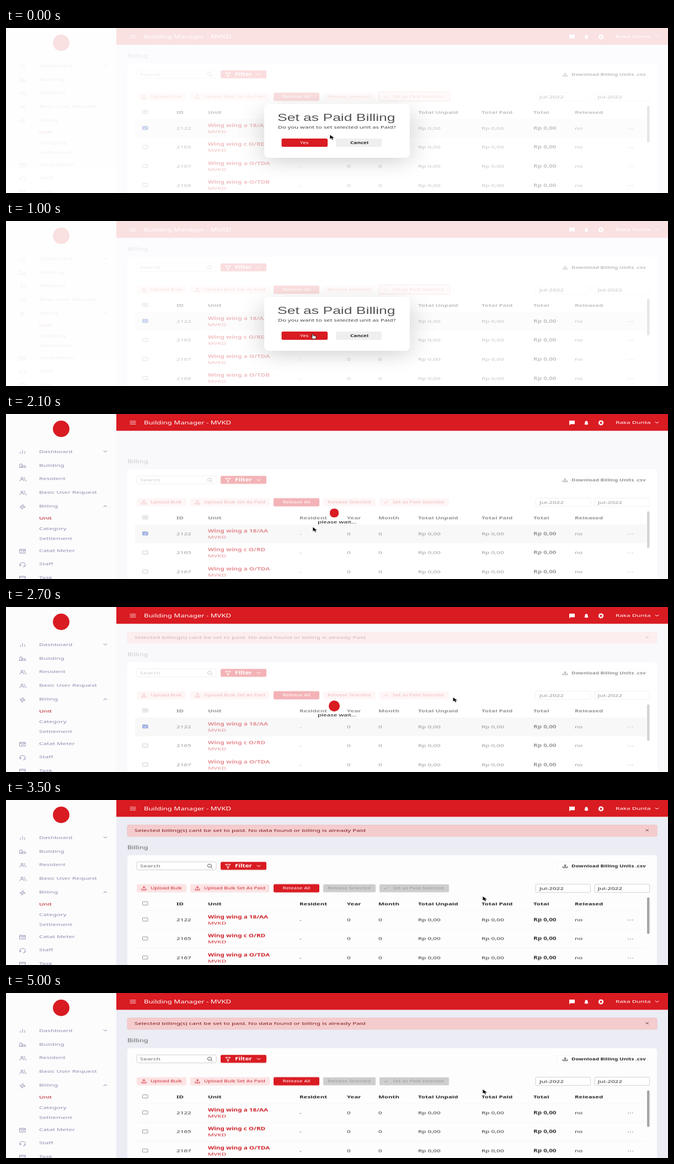
Animation, 1200 px wide and 300 px high, one loop 5100 ms. Source, as an HTML page:

```html
<!DOCTYPE html>
<html lang="en">
<head>
<meta charset="utf-8">
<title>Set as Paid Billing</title>
<style>
  html, body { margin: 0; width: 100%; height: 100%; overflow: hidden; background: #fff; }
  svg { display: block; width: 1200px; height: 300px; font-family: "Noto Sans", "Open Sans", sans-serif; }
  svg * { animation-duration: 5.1s; animation-iteration-count: infinite; animation-timing-function: step-end; }

  .base { animation-name: base; }
  .cells { animation-name: cells; }
  .nav { animation-name: nav; }
  .shift { animation-name: shift; }
  .alert { animation-name: alert; }
  .picked { animation-name: picked; }
  .idle { animation-name: idle; }
  .focus { animation-name: focus; }
  .dialog { animation-name: dialog; }
  .ring { animation-name: ring; }
  .loader { animation-name: loader; }
  .pulse { transform-origin: 595px 180px; animation: pulse 1.2s -.9s ease-in-out infinite; }
  .cursor { animation-name: move; animation-timing-function: linear; }
  .arrow { animation-name: arrow; }
  .hand { animation-name: hand; }

  @keyframes base { 0% { opacity: .15 } 41.176% { opacity: .33 } 56.863%, 100% { opacity: 1 } }
  @keyframes cells { 0% { opacity: .28 } 41.176% { opacity: .5 } 56.863%, 100% { opacity: 1 } }
  @keyframes nav { 0% { opacity: .13 } 41.176%, 100% { opacity: 1 } }
  @keyframes shift { 0% { transform: translateY(-35.5px) } 41.176%, 100% { transform: none } }
  @keyframes alert { 0% { opacity: 0 } 43.137%, 100% { opacity: 1 } }
  @keyframes picked { 0% { opacity: 1 } 56.863%, 100% { opacity: 0 } }
  @keyframes idle { 0% { opacity: 0 } 56.863%, 100% { opacity: 1 } }
  @keyframes focus { 0% { opacity: 1 } 39.216%, 100% { opacity: 0 } }
  @keyframes dialog { 0% { opacity: 1 } 41.176%, 100% { opacity: 0 } }
  @keyframes ring { 0% { opacity: 0 } 31.373% { opacity: 1 } 41.176%, 100% { opacity: 0 } }
  @keyframes loader { 0% { opacity: 0 } 41.176% { opacity: 1 } 56.863%, 100% { opacity: 0 } }
  @keyframes pulse { 0%, 100% { transform: scale(1) } 50% { transform: scale(.84) } }
  @keyframes move {
    0%, 1.961% { transform: translate(587px, 194px) }
    11.765%, 45.098% { transform: translate(556px, 205.5px) }
    52.941% { transform: translate(810px, 164px) }
    58.824%, 100% { transform: translate(864px, 175px) }
  }
  @keyframes arrow { 0% { opacity: 1 } 7.843% { opacity: 0 } 41.176%, 100% { opacity: 1 } }
  @keyframes hand { 0% { opacity: 0 } 7.843% { opacity: 1 } 35.294%, 100% { opacity: 0 } }
</style>
</head>
<body>
<script>
const RED = '#d91b22', DARK = '#222', MUTED = '#908dae', WIDE = 1.47;

// The whole screen is wider than its natural ratio, so all type shares one scale.
const text = (x, y, s, { z = 11.7, w = 400, c = DARK, f = '' } = {}) =>
  `<text transform="translate(${x} ${(y + z * .243).toFixed(2)}) scale(${WIDE} 1)" font-size="${(z / WIDE).toFixed(2)}" ` +
  `font-weight="${w}" fill="${c}"${f && ` font-family="${f}"`}>${s}</text>`;
const box = (x, y, w, h, fill, r = 2.5, stroke = 'none') =>
  `<rect x="${x}" y="${y}" width="${w}" height="${h}" rx="${r}" fill="${fill}" stroke="${stroke}" stroke-width=".8"/>`;
const line = (d, c, w = 1) =>
  `<path d="${d}" fill="none" stroke="${c}" stroke-width="${w}" stroke-linecap="round" stroke-linejoin="round"/>`;
const group = (name, ...parts) => `<g class="${name}">${parts.join('')}</g>`;
const chevron = (x, y, c, up = 1) => line(`M${x - 3} ${y - up}l3 ${2 * up}l3 ${-2 * up}`, c);
const arrowIcon = (x, y, c, up = 1) =>
  line(`M${x - 4} ${y + 1}v2h8v-2M${x} ${y + 1}v-4M${x - 2} ${y - (up ? 1.5 : .5)}l2 ${up ? -1.5 : 1.5}l2 ${up ? 1.5 : -1.5}`, c);
const check = (y, mark = '') => box(247.5, y - 3, 9.5, 6, '#fff', 1, '#777') + mark;

// Sidebar and top bar
const menu = [
  [68, 'Dashboard', 'M26 72v-3M30 72v-6M34 72v-4'],
  [93, 'Building', 'M25 97v-6h4v6M29 97v-3h6v3M24 97h12'],
  [117.5, 'Resident', 'M25 122q0-3 4-3t4 3M27 116.500a2 1.500 0 1 0 4 0a2 1.500 0 1 0-4 0M33 115q3 1 0 3M34 119q3 1 3 3'],
  [142.500, 'Basic User Request', 'M25 147q0-3 4-3t4 3M27 141.500a2 1.500 0 1 0 4 0a2 1.500 0 1 0-4 0M33 140q3 1 0 3M34 144q3 1 3 3'],
  [167.500, 'Billing', 'M31 165l-6 4h4l-1 4l7-4.500h-4z'],
  [248, 'Catat Meter', 'M25 246h10v7h-10zM25 248h10M28 250l1.500 1.300l3-2'],
  [272.500, 'Staff', 'M25 275v-1q0-4 5-4t5 4v2h-2M25 274h2v2h-2M35 276q0 2-4 2'],
  [297, 'Task', 'M25 295h10v7h-10zM25 297h10']
];
const gear = `<circle cx="1078.500" cy="16" r="3" fill="none" stroke="#fff" stroke-width="2.200"/>` +
  `<circle cx="1078.500" cy="16" r="4.300" fill="none" stroke="#fff" stroke-width="1.200" stroke-dasharray="1.700 1.680"/>`;
const nav = group('nav',
  box(0, 0, 200, 300, '#fcfcfd', 0),
  box(200, 0, 1000, 30.5, RED, 0),
  `<circle cx="100" cy="27" r="15" fill="${RED}"/>`,
  ...menu.map(([y, s, d]) => line(d, MUTED, .9) + text(60, y, s, { c: MUTED })),
  text(60, 189, 'Unit', { c: '#b81d22' }),
  text(60, 208, 'Category', { c: MUTED }),
  text(60, 226.5, 'Settlement', { c: MUTED }),
  chevron(180, 68, MUTED), chevron(180, 167.5, MUTED, -1),
  line('M225 13h10M225 15.700h10M225 18.400h10', '#fff', .8),
  text(250, 15.5, 'Building Manager - MVKD', { z: 13.1, c: '#fff' }),
  '<path d="M1021 12h10v6.500h-7.500l-2.500 2zM1048 19q1.500-1 1.500-3.500q0-3 2.500-3t2.500 3q0 2.500 1.500 3.500zM1050.500 19.500h3l-1.500 1z" fill="#fff"/>',
  gear,
  text(1105, 15.5, 'Raka Dunta', { c: '#fff' }),
  chevron(1180, 15.5, '#fff'));

// Page furniture
const button = (x, w, s, tx, fill, c) => box(x, 153, w, 15, fill) + text(tx, 160.5, s, { z: 10, c });
const PALE = '#fce3e4', INK = '#cf252c';
const tick = c => line('M686 160.500l2 1.700l4-4', c);
const base = group('base',
  box(200, 30, 1000, 270, '#ebecf4', 0),
  group('alert',
    box(220, 45.5, 960, 20.5, '#f5cccd', 2, '#efbdbf'),
    text(233, 55.5, 'Selected billing(s) cant be set to paid. No data found or billing is already Paid', { c: '#7c1a1e' }),
    line('M1160 53.500l4.500 3M1164.500 53.500l-4.500 3', '#8a5558')),
  group('shift',
    text(220, 86, 'Billing', { z: 12.9, c: '#666' }),
    box(220, 100, 960, 260, '#fdfdfd', 5),
    box(237, 112.5, 144, 14.5, '#fff', 2.5, '#c4c4c8'),
    text(243, 120, 'Search', { c: '#666' }),
    '<ellipse cx="369" cy="119.500" rx="3.600" ry="2.800" fill="none" stroke="#555"/>', line('M371.500 122l2.500 2', '#555'),
    box(389, 112.5, 83, 14.5, RED),
    line('M398 117h9l-3.500 3.500v3l-2 .8v-3.800z', '#fff'),
    text(415, 120, 'Filter', { w: 700, c: '#fff' }), chevron(458, 120, '#fff'),
    box(1000, 113, 163, 14, '#fff', 2.5, '#f1f1f4'),
    button(237, 90, 'Upload Bulk', 262, PALE, INK), arrowIcon(250, 160.5, INK),
    button(334, 144, 'Upload Bulk Set As Paid', 359, PALE, INK), arrowIcon(347, 160.5, INK),
    button(485, 83, 'Release All', 501.5, RED, '#fff'),
    group('picked',
      button(575, 95, 'Release Selected', 583, PALE, INK),
      button(677, 126, 'Set as Paid Selected', 701, PALE, INK), tick(INK)),
    group('idle',
      button(575, 95, 'Release Selected', 583, '#cecece', '#999'),
      button(677, 126, 'Set as Paid Selected', 701, '#cecece', '#999'), tick('#999')),
    group('focus', box(675.5, 152, 129, 16.500, 'none', 2.5, RED)),
    box(960, 153, 99.5, 15, '#fff', 2, '#c4c4c8'),
    box(1067, 153, 99.5, 15, '#fff', 2, '#c4c4c8'),
    ...[201, 235, 269.700, 304.400].map(y => line(`M234 ${y}H1160`, '#f3f3f5', .7)),
    group('picked', box(234, 201, 927, 34, '#e8e8ea', 0))));

// Table
const heads = [[309, 'ID'], [366, 'Unit'], [532, 'Resident'], [618, 'Year'], [675, 'Month'],
  [747, 'Total Unpaid'], [862, 'Total Paid'], [956, 'Total'], [1031, 'Released']];
const rows = [['2122', 'a 18/AA'], ['2165', 'c O/RD'], ['2167', 'a O/TDA'], ['2168', 'a O/TDB']];
const row = ([id, unit], i) => {
  const y = 217.5 + 34.6 * i, cell = (x, s, w) => text(x, y, s, { w, c: '#333' });
  return check(y - .3) + cell(309, id) +
    text(366, y - 5.3, 'Wing wing ' + unit, { w: 700, c: '#cc1f27' }) + text(366, y + 5.8, 'MVKD', { c: '#cc1f27' }) +
    cell(532, '-') + cell(618, '0') + cell(675, '0') + cell(747, 'Rp 0,00') + cell(862, 'Rp 0,00') +
    cell(956, 'Rp 0,00', 700) + cell(1031, 'no') +
    [1128, 1132, 1136].map(x => `<circle cx="${x}" cy="${y + .7}" r=".7" fill="#555"/>`).join('');
};
const cells = group('cells', group('shift',
  arrowIcon(1013.5, 120, DARK, 0),
  text(1025, 120, 'Download Billing Units .csv', { z: 10, w: 600 }),
  text(967, 160.5, 'Jul-2022'), text(1073, 160.5, 'Jul-2022'),
  check(188),
  ...heads.map(([x, s]) => text(x, 188.5, s, { z: 11.5, w: 700 })),
  ...rows.map(row),
  group('picked',
    line('M249.500 188h5.500', '#555'),
    box(247, 214, 10.5, 6.5, '#3f66cf', 1), line('M249.500 217.300l2 1.600l4-3.300', '#fff')),
  box(1162, 177, 4.5, 66.5, '#a6a6a8', 2)));

const dialog = group('dialog',
  '<rect x="468" y="147" width="264" height="98" rx="8" fill="#000" opacity=".17" filter="url(#soft)"/>',
  box(468, 138, 264, 98, '#fff', 8),
  text(492, 162.5, 'Set as Paid Billing', { z: 26.5, c: '#555', f: 'Liberation Sans, Arial, sans-serif' }),
  text(493, 180.5, 'Do you want to set selected unit as Paid?', { z: 11.2, c: '#444' }),
  group('ring', box(498.3, 199.700, 86, 17.600, '#8d7474', 3.5, '#666')),
  box(499.5, 201, 83.5, 15, RED),
  text(533, 208.5, 'Yes', { z: 10, c: '#fff' }),
  box(598, 201, 83, 15, '#efefef'),
  text(624, 208.5, 'Cancel', { z: 10, w: 600 }));

const loader = group('loader',
  `<circle class="pulse" cx="595" cy="180" r="10" fill="${RED}"/>`,
  text(565, 196.5, 'please wait...', { z: 11.6, c: '#111' }));

const cursor = group('cursor',
  group('arrow', '<path d="M0 0v8l2.500-1.500l2 3l1.900-.7l-1.700-2.800h3.800z" fill="#000" stroke="#fff" stroke-width=".6"/>'),
  group('hand', '<path d="M-1 0q1.500-.8 2 .4v2.400l4 .8q1.500.4 1.300 2l-.8 3.400h-5l-3.700-3.600q.6-1.200 2.200 0z" fill="#fff" stroke="#000" stroke-width=".9"/>'));

document.body.innerHTML = `<svg viewBox="0 0 1200 300">
  <defs><filter id="soft" x="-50%" y="-80%" width="200%" height="260%"><feGaussianBlur stdDeviation="24 16"/></filter></defs>
  ${base}${cells}${nav}${dialog}${loader}${cursor}</svg>`;
</script>
</body>
</html>
```
